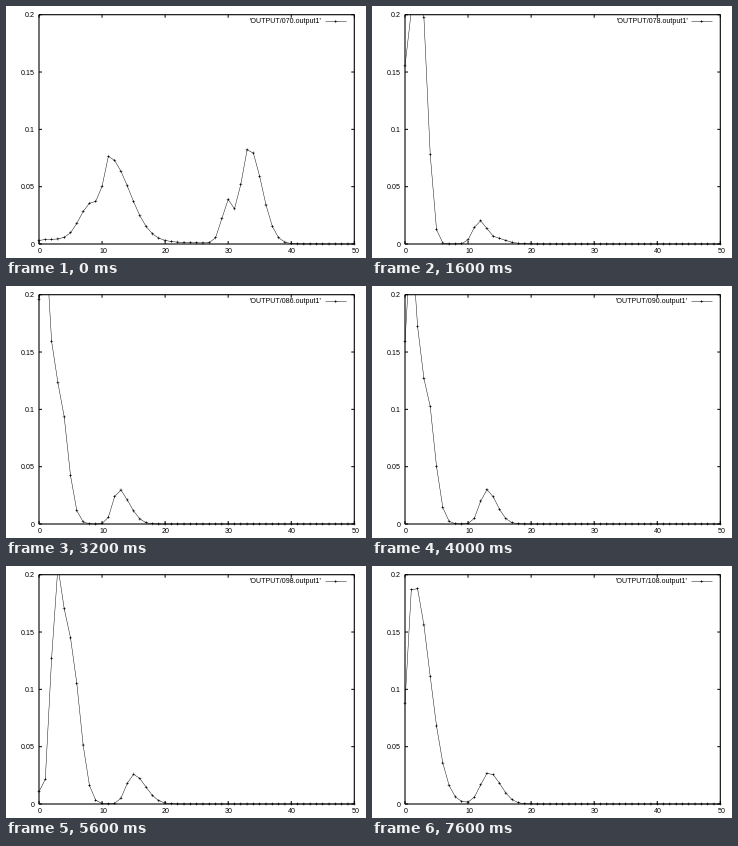
Recreate the animation shown at these times as a matplotlib script. Size 360 px wide and 252 px high, loop 8000 ms.

```python
import numpy as np
import matplotlib.pyplot as plt
from matplotlib.animation import FuncAnimation

W, H, DPI = 360, 252, 100
PX = 72 / DPI  # points per pixel
LEFT, RIGHT, TOP, BOTTOM = 33.0, 348.3, 8.7, 238.0
X_MAX, Y_MAX = 50, 0.2
FRAMES, INTERVAL = 20, 400
SITES = np.arange(X_MAX + 1)


def hump(centre, height, left, right):
    """Bell with its own spread on either side, height in thousandths."""
    d = SITES - centre
    spread = np.where(d < 0, left, right)
    return height / 1000 * np.exp(-0.5 * (d / spread) ** 2)


twin = (hump(2, 4, 3, 14) + hump(8.3, 32, 1.8, 1.5) + hump(11.3, 70, 1, 3.1)
        + hump(30, 35, 1, 0.7) + hump(33.3, 84, 1.3, 2))
spike = (hump(2.25, 304, 1.22, 1.12) + hump(11.1, 14, 0.7, 0.6)
         + hump(13, 6, 1.7, 2.5))
wall = (hump(0, 355, 1, 1.19) + hump(3.1, 93, 0.6, 0.85)
        + hump(12.2, 43, 0.7, 0.8) + hump(14.5, 6.5, 1, 1.3))
slope = (hump(1, 225, 1.14, 0.75) + hump(3.2, 122, 1.3, 1.35)
         + hump(12.9, 30, 1, 1.6))
hill = (hump(0, 10, 1, 0.5) + hump(2.72, 176, 0.82, 0.92)
        + hump(4.9, 137, 1.2, 1.5) + hump(14.9, 26, 1.05, 1.95))
ridge = (hump(4.3, 112, 1.28, 1.2) + hump(7.1, 127, 0.82, 2)
         + hump(16.2, 13, 1.7, 1.5) + hump(19.1, 14, 0.8, 2)
         + hump(32, 8.5, 1.8, 4))
mound = hump(1.3, 195, 1.03, 2.55) + hump(13.3, 27.5, 1.3, 1.85)

# first frame, curve, and how the mass travels on to the next curve
STAGES = [(0, twin, 0.3), (3, spike, 1), (6, wall, 0.3), (10, slope, "drift"),
          (14, hill, "drift"), (16, ridge, "drift"), (19, mound, 1)]


def drift(a, b, t):
    """Carry distribution a to b by moving its quantiles."""
    edges = np.arange(X_MAX + 2) - 0.5
    q = np.linspace(0, 1, 4001)

    def quantiles(p):
        cdf = np.concatenate([[0], np.cumsum(p + 1e-7)])
        return np.interp(q, cdf / cdf[-1], edges)

    moved = (1 - t) * quantiles(a) + t * quantiles(b)
    return np.diff(np.interp(edges, moved, q))


def values(frame):
    for (f0, a, mode), (f1, b, _) in zip(STAGES, STAGES[1:]):
        if frame == f0:
            return a
        if frame < f1:
            t = (frame - f0) / (f1 - f0)
            if mode == "drift":
                return drift(a, b, t)
            return a + (b - a) * t ** mode
    return STAGES[-1][1]


def to_x(x):
    return LEFT + (RIGHT - LEFT) * x / X_MAX


def to_y(y):
    return BOTTOM - (BOTTOM - TOP) * y / Y_MAX


plt.rcParams["font.family"] = "Liberation Sans"
fig = plt.figure(figsize=(W / DPI, H / DPI), dpi=DPI, facecolor="white")
ax = fig.add_axes([0, 0, 1, 1])
ax.set_xlim(0, W)
ax.set_ylim(H, 0)
ax.axis("off")


def stroke(xs, ys, width):
    return ax.plot(xs, ys, color="black", lw=width * PX, snap=False,
                   solid_capstyle="butt", solid_joinstyle="miter")[0]


def label(x, y, text, ha):
    return ax.text(x, y, text, ha=ha, va="baseline", fontsize=7.1 * PX)


def crosses(xs, ys, r=1.5):
    """Plus signs as one broken line, so they keep sub-pixel places."""
    gap = np.nan
    px = np.add.outer(xs, [-r, r, gap, 0, 0, gap]).ravel()
    py = np.add.outer(ys, [0, 0, gap, -r, r, gap]).ravel()
    return px, py


stroke([LEFT, RIGHT, RIGHT, LEFT, LEFT], [TOP, TOP, BOTTOM, BOTTOM, TOP], 1.1)
for x in range(0, X_MAX + 1, 10):
    px = to_x(x)
    stroke([px, px], [BOTTOM, BOTTOM - 3], 1)
    stroke([px, px], [TOP, TOP + 3], 1)
    label(px + 1, 247, str(x), "center")
for y in (0, 0.05, 0.1, 0.15, 0.2):
    py = to_y(y)
    stroke([LEFT, LEFT + 3], [py, py], 1)
    stroke([RIGHT, RIGHT - 3], [py, py], 1)
    label(29, py + 2.6, f"{y:g}", "right")

THIN, CROSS = 0.45, 0.5
title = label(316, 17.4, "", "right")
stroke([319.5, 340.5], [15.5, 15.5], THIN)
stroke(*crosses([329.8], [15.5]), CROSS)

line = stroke([], [], THIN)
line.set_clip_path(plt.Rectangle((LEFT, TOP), RIGHT - LEFT, BOTTOM - TOP + 1,
                                 transform=ax.transData))
marks = stroke([], [], CROSS)


def update(frame):
    ys = values(frame)
    line.set_data(to_x(SITES), to_y(ys))
    shown = ys <= Y_MAX
    marks.set_data(*crosses(to_x(SITES[shown]), to_y(ys[shown])))
    title.set_text(f"'OUTPUT/{70 + 2 * frame:03d}.output1'")
    return line, marks, title


anim = FuncAnimation(fig, update, frames=FRAMES, interval=INTERVAL,
                     repeat=True, repeat_delay=0)
plt.show()
```
